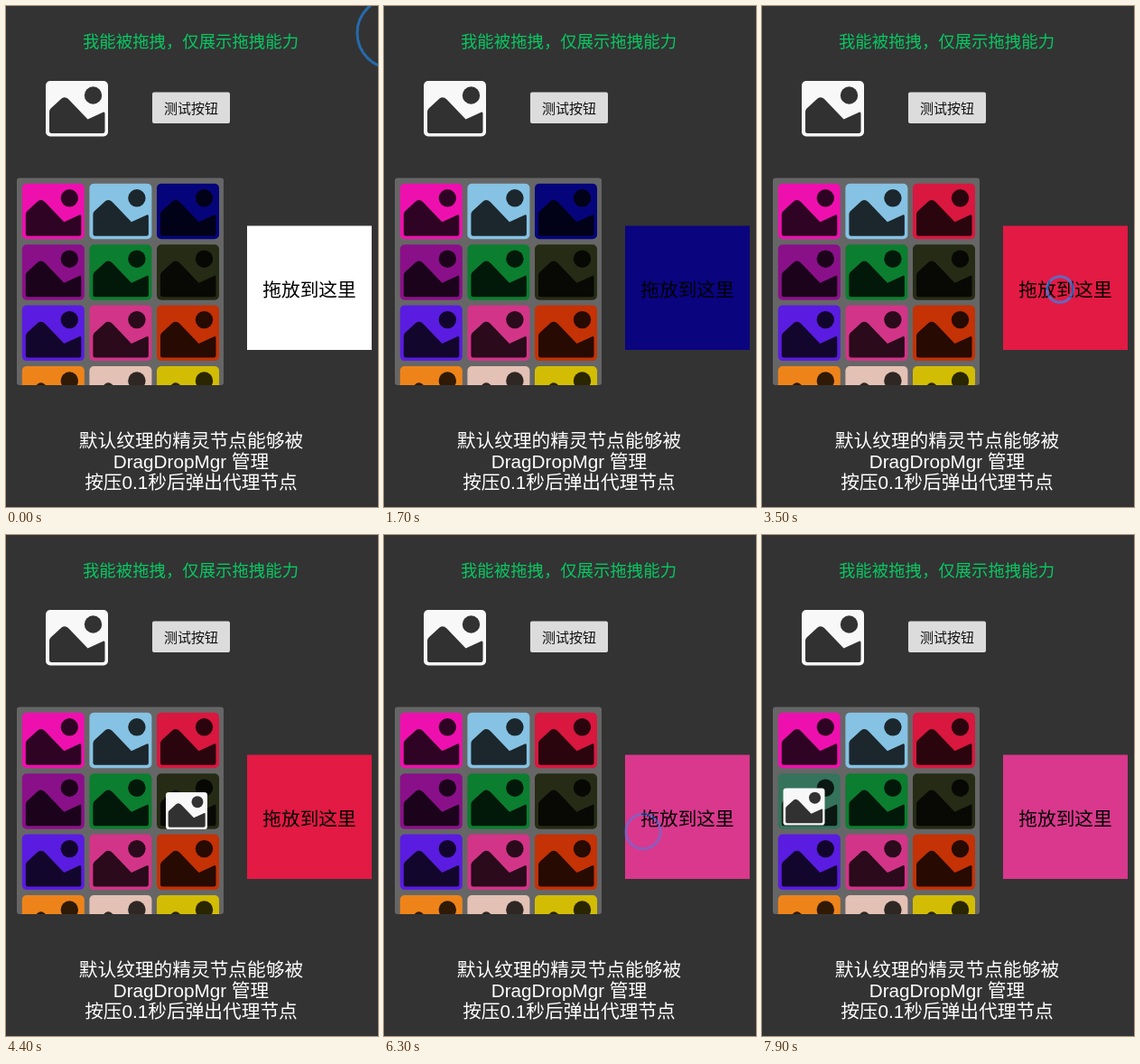
An HTML page that plays this animation: 412 by 555 pixels, repeating every 8 s.

```html
<!DOCTYPE html>
<html lang="zh-CN">
<head>
<meta charset="utf-8">
<title>Drag and drop</title>
<style>
  html, body { margin: 0; width: 100%; height: 100%; overflow: hidden; background: #333; }
  svg { display: block; width: 412px; height: 555px; }
  text { font-family: "Liberation Sans", "Noto Sans CJK SC", "Noto Sans CJK", sans-serif; text-anchor: middle; }
</style>
</head>
<body>
<svg viewBox="0 0 412 555">
  <defs>
    <g id="sprite">
      <rect width="69" height="61.5" rx="5"/>
      <g fill="#000" fill-opacity=".8">
        <circle cx="52.5" cy="16" r="9.7"/>
        <path d="M4 34Q4 32 5.500 30.500L17.500 19.500Q21.500 16.500 25.500 20.500L46.500 42.500L64 34.500Q65.500 34 65.500 36V55.500Q65.500 58 63 58H6.500Q4 58 4 55.500Z"/>
      </g>
    </g>
    <clipPath id="panelClip"><rect x="12" y="190.500" width="229" height="229.500"/></clipPath>
  </defs>
  <rect width="412" height="555" fill="#333"/>
  <text x="204.500" y="46" font-size="18.400" fill="#07c862">我能被拖拽，仅展示拖拽能力</text>
  <use href="#sprite" x="44" y="83" fill="#f8f8f8"/>
  <rect x="162" y="95.500" width="86" height="34.500" rx="2" fill="#dcdcdc"/>
  <text x="205" y="118.700" font-size="15" fill="#111">测试按钮</text>
  <rect x="12" y="190.500" width="229" height="229.500" rx="3" fill="#666"/>
  <g id="cells" clip-path="url(#panelClip)"></g>
  <rect id="target" x="267" y="243.500" width="138" height="137.500"/>
  <text x="336" y="321.500" font-size="20.700">拖放到这里</text>
  <g font-size="20.700" fill="#fff">
    <text x="205" y="489">默认纹理的精灵节点能够被</text>
    <text x="205" y="511.500">DragDropMgr 管理</text>
    <text x="205" y="534.500">按压0.1秒后弹出代理节点</text>
  </g>
  <use id="agent" href="#sprite" fill="#f8f8f8"/>
  <circle id="ring" fill="none" stroke="#1e90ff"/>
</svg>
<script>
const LOOP = 8000, STEP = 100;
const $ = id => document.getElementById(id);
const set = (el, attrs) => { for (const k in attrs) el.setAttribute(k, attrs[k]); };

const cellColors = [
  '#ee10ae', '#86c2e3', '#05047a',
  '#8a1089', '#0c7e30', '#262b15',
  '#5a1ce0', '#d23488', '#c43206',
  '#ee8419', '#e3c1b4', '#d2bd04'
];
const cells = cellColors.map((fill, i) => {
  const use = document.createElementNS('http://www.w3.org/2000/svg', 'use');
  set(use, { href: '#sprite', x: 17.8 + (i % 3) * 74.6, y: 196.8 + Math.floor(i / 3) * 67.4, fill });
  return $('cells').appendChild(use);
});

const recolors = [
  { cell: 2, at: 2400, fill: '#d9173f' },
  { cell: 3, at: 7200, fill: '#35735c' }
];
const targetColors = [[0, '#fff'], [1500, '#0a047f'], [3500, '#e31a44'], [4800, '#293017'], [6200, '#d9388d']];

// Ripples: start, steps, first and last radius, from x,y, optional drift per step
const press = (at, x, y, last, dx = 0, dy = 0) => ({ at, x, y, dx, dy, steps: 3, first: 17, last, alpha: [1, .6, .25] });
const drop = (at, x, y, steps = 2) => ({ at, x, y, dx: 0, dy: 0, steps, first: 14.3, last: 24, alpha: [.65, .4, .15] });
const ripples = [
  press(-100, 428, 30, 61),
  press(600, 211, 223, 64),
  drop(1500, 310, 298),
  press(2000, 189.5, 232.5, 61),
  press(2600, 199, 222, 63, -9, 8),
  drop(3500, 330, 314),
  press(4000, 200.5, 305.5, 66),
  drop(4800, 318, 313),
  press(5300, 128, 353, 68),
  drop(6200, 287, 328.5, 3),
  press(6900, 48.5, 291.5, 69),
  press(7600, 46.5, 300, 71)
];

// Drags: shown, move start, move end, hidden, from, to
const drags = [
  [900, 1000, 1400, 1500, [212, 222], [310, 298]],
  [2900, 3000, 3500, 3500, [189, 230], [330, 314]],
  [4300, 4500, 4800, 4800, [200, 305.5], [318, 313]],
  [5600, 5600, 6000, 6200, [128, 353], [287.5, 328]],
  [7900, 8000, 8100, 8000, [46.5, 301], [46.5, 301]]
];

const clamp = v => Math.min(1, Math.max(0, v));
const ease = u => u * u * (3 - 2 * u);

function drawRing(t) {
  const r = ripples.find(r => t >= r.at && t < r.at + r.steps * STEP);
  $('ring').style.display = r ? '' : 'none';
  if (!r) return;
  const k = (t - r.at) / STEP;
  set($('ring'), {
    cx: r.x + r.dx * k, cy: r.y + r.dy * k,
    r: r.first + (r.last - r.first) * k / 2,
    'stroke-width': 3, 'stroke-opacity': r.alpha[k]
  });
}

function drawAgent(t) {
  const drag = drags.find(d => t >= d[0] && t < d[3]);
  $('agent').style.display = drag ? '' : 'none';
  if (!drag) return;
  const [, start, end, , from, to] = drag;
  const u = ease(clamp((t - start) / (end - start)));
  const [x, y] = from.map((v, i) => v + (to[i] - v) * u);
  set($('agent'), { transform: `translate(${x - 23} ${y - 20.5}) scale(${2 / 3})` });
}

function frame(now) {
  const t = Math.floor(now % LOOP / STEP) * STEP;
  for (const { cell, at, fill } of recolors) set(cells[cell], { fill: t >= at ? fill : cellColors[cell] });
  set($('target'), { fill: targetColors.filter(c => t >= c[0]).pop()[1] });
  drawAgent(t);
  drawRing(t);
}

const begin = performance.now();
function tick() {
  frame(performance.now() - begin);
  requestAnimationFrame(tick);
}
tick();
</script>
</body>
</html>
```
